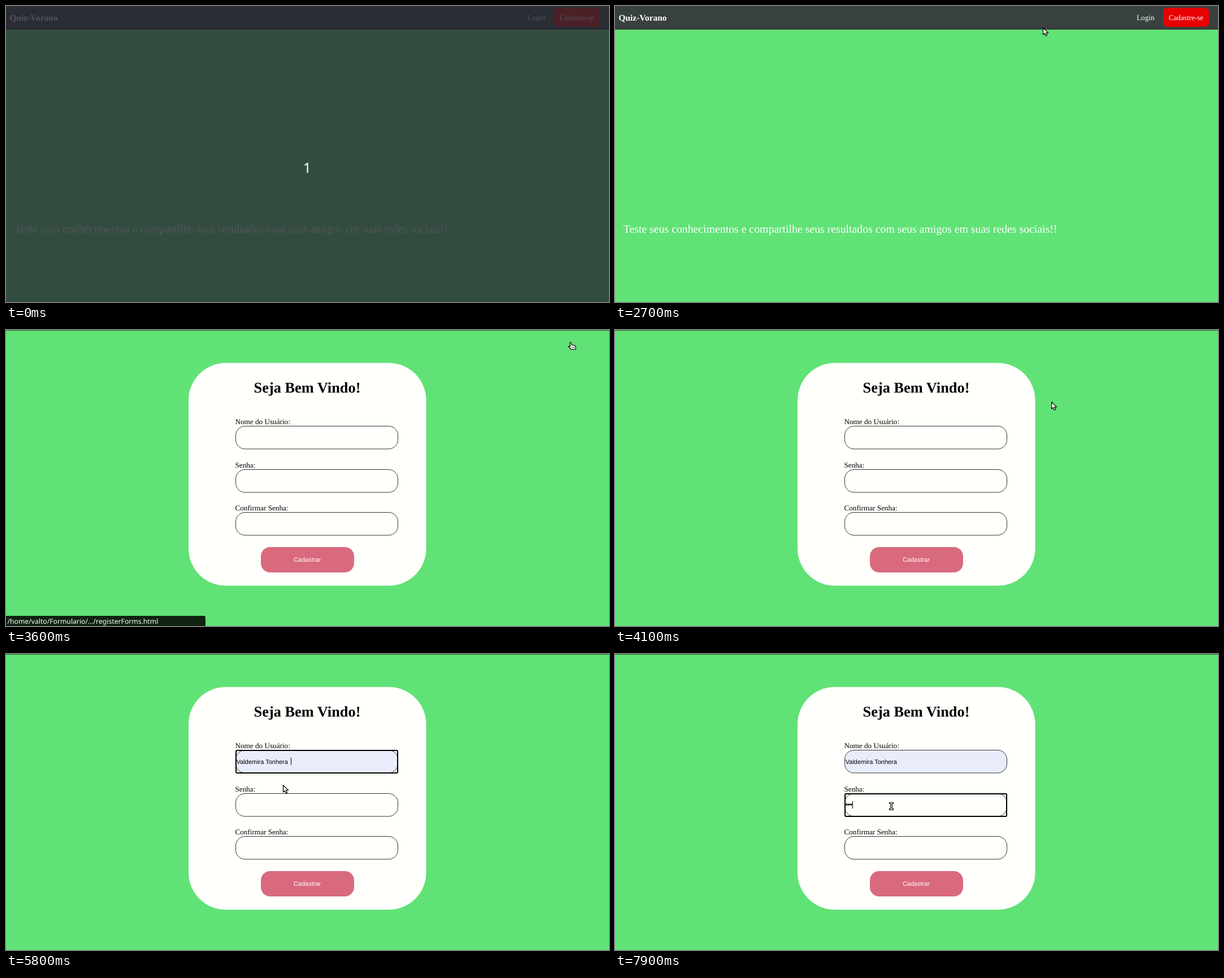
Animation, 1067 px wide and 525 px high, one loop 8 s. Source, as an HTML page with a canvas:

```html
<!DOCTYPE html>
<html lang="pt-BR">
<head>
<meta charset="utf-8">
<title>Cadastro</title>
<style>
  html, body { margin: 0; width: 1067px; height: 525px; overflow: hidden; }
  canvas { display: block; }
</style>
</head>
<body>
<canvas id="stage" width="1067" height="525"></canvas>
<script>
const ctx = document.getElementById('stage').getContext('2d');
const LOOP = 8000, STEP = 100;
const GREEN = '#61e276', PAPER = '#fffffc', INK = '#000';
const SERIF = '"Liberation Serif", serif';
const SANS = '"Liberation Sans", sans-serif';
const UI = '"Noto Sans", sans-serif';
const USER = 'Valdemira Tonhera';
const SUGGESTIONS = [USER, 'valdemirat.sorelo', 'admin', 'vtonhe52@fex.example', 'admin2', 'sto exp.'];

// Pointer key points: time, x, y, shape
const POINTER = [
  [2700, 757, 38, 'arrow'], [2800, 757, 38, 'arrow'], [3000, 880, 66, 'arrow'],
  [3200, 1057, 48, 'arrow'], [3400, 999, 22, 'hand'], [3600, 999, 22, 'hand'],
  [3700, 985, 30, 'arrow'], [4400, 612, 200, 'arrow'], [4500, 609, 201, 'beam'],
  [5200, 609, 201, 'beam'], [5300, 585, 214, 'arrow'], [5500, 490, 232, 'arrow'],
  [5800, 490, 232, 'arrow'], [6100, 452, 221, 'arrow'], [6200, 486, 237, 'arrow'],
  [6300, 486, 237, 'arrow'], [6400, 487, 241, 'arrow'], [6500, 493, 253, 'beam'],
  [7200, 493, 253, 'beam'], [7500, 489, 270, 'beam'], [LOOP, 489, 270, 'beam']
];

function text(str, x, y, font, color = INK, align = 'left') {
  ctx.font = font;
  ctx.fillStyle = color;
  ctx.textAlign = align;
  ctx.fillText(str, x, y);
}

function box(x, y, w, h, r, fill, stroke, lineWidth = 1) {
  ctx.beginPath();
  ctx.roundRect(x, y, w, h, r);
  if (fill) { ctx.fillStyle = fill; ctx.fill(); }
  if (stroke) { ctx.strokeStyle = stroke; ctx.lineWidth = lineWidth; ctx.stroke(); }
}

const SHAPES = {
  arrow: new Path2D('M.5 .8V13L3.4 10.4 5.4 15 7.6 14 5.6 9.6H9.6Z'),
  hand: new Path2D('M-1.5 0.5Q0 -1 1 .8L2 4.5 7 5.6Q9 6 9 8V12.5H1L-3.5 7.5Q-3 6 -.5 7.2Z'),
  beam: new Path2D('M-3.5 -6.5H3.5V-4.5H1.3V4.5H3.5V6.5H-3.5V4.5H-1.3V-4.5H-3.5Z')
};

function drawPointer(t) {
  if (t < POINTER[0][0]) return;
  const i = POINTER.findLastIndex(p => p[0] <= t);
  const [t0, x0, y0, shape] = POINTER[i];
  const [t1, x1, y1] = POINTER[i + 1];
  const k = (t - t0) / (t1 - t0);
  ctx.save();
  ctx.translate(Math.round(x0 + (x1 - x0) * k), Math.round(y0 + (y1 - y0) * k));
  ctx.fillStyle = '#fff';
  ctx.strokeStyle = INK;
  ctx.lineWidth = 1.2;
  ctx.lineJoin = 'round';
  ctx.fill(SHAPES[shape]);
  ctx.stroke(SHAPES[shape]);
  if (shape === 'hand') {
    ctx.beginPath();
    for (const x of [2.5, 4.5, 6.5]) { ctx.moveTo(x, 8); ctx.lineTo(x, 10.5); }
    ctx.lineWidth = 0.8;
    ctx.stroke();
  }
  ctx.restore();
}

function drawHome(t) {
  ctx.fillStyle = '#384040';
  ctx.fillRect(0, 0, 1067, 42);
  text('Quiz-Vorano', 6.5, 26, 'bold 15.42px ' + SERIF, '#fff');
  text('Login', 923, 24.5, '13.18px ' + SERIF, '#fff');
  box(970, 3, 81.5, 34, 8, t >= 3400 ? '#c80000' : '#e60000');
  text('Cadastre-se', 979.7, 24.5, '13.18px ' + SERIF, '#fff');
  text('Teste seus conhecimentos e compartilhe seus resultados com seus amigos em suas redes sociais!!',
    14.8, 402, '19.77px ' + SERIF, '#fff');
  if (t < 300) {
    ctx.fillStyle = 'rgba(39,41,49,.8)';
    ctx.fillRect(0, 0, 1067, 525);
    text('1', 533, 296, '25px ' + UI, '#fff', 'center');
  }
}

function drawField(label, y, focused, filled) {
  text(label, 405.5, y - 3.5, '13.18px ' + SERIF);
  box(406.5, y + .5, 287, 40.5, 16.5, filled ? '#e8ecfb' : PAPER, '#333');
  if (focused) box(407, y + 1, 286, 40, 2, null, INK, 2);
}

function drawCaret(x, y) {
  ctx.fillStyle = INK;
  ctx.fillRect(x, y, 1, 13);
}

function drawSuggestions(t) {
  ctx.save();
  ctx.shadowColor = 'rgba(0,0,0,.35)';
  ctx.shadowBlur = t < 4900 ? 4 : 8;
  ctx.shadowOffsetY = 2;
  box(405, 212, 289, 191.5, 2, PAPER);
  ctx.restore();
  if (t >= 5500) box(405, 219, 289, 30, 0, '#e9e9e7');
  SUGGESTIONS.forEach((s, i) => text(s, 415, 238.3 + i * 29.65, '500 12.9px ' + UI, '#222'));
}

function drawForm(t) {
  const onUser = t >= 4800 && t < 6700, onPassword = t >= 6700;
  const filled = t >= 5500;
  ctx.fillStyle = '#244a2b';
  ctx.fillRect(0, 0, 1067, 1);
  box(323, 58.5, 420.5, 395, 66, PAPER);
  text('Seja Bem Vindo!', 533, 111, 'bold 26.36px ' + SERIF, INK, 'center');
  drawField('Nome do Usuário:', 170, onUser, filled);
  drawField('Senha:', 247, onPassword);
  drawField('Confirmar Senha:', 323, false);
  box(451, 385, 165, 45, 16.5, '#d96a7d');
  text('Cadastrar', 533, 411, '10.98px ' + SANS, '#fff', 'center');

  if (filled) text(USER, 407.8, 194.5, '10.98px ' + SANS);
  if (t >= 4800 && t < 5300) drawCaret(408, 184);
  if (t >= 5800 && t < 6200) drawCaret(504, 184);
  if (t >= 4800 && t < 5800) drawSuggestions(t);

  const dots = Math.max(0, Math.min(3, Math.floor((t - 7200) / 200)));
  for (let i = 0; i < dots; i++) box(408.2 + i * 4, 265.2, 3.6, 3.6, 1.8, INK);
  if (onPassword && (t < 7200 || t >= 7400)) drawCaret(408 + dots * 4, 261);

  if (t < 3900) {
    box(0, 507, 353, 18, [0, 3, 0, 0], '#102212');
    text('/home/valto/Formulario/…/registerForms.html', 2.5, 520.5, '12.2px ' + UI, '#fff');
  }
}

function frame(now) {
  const t = Math.floor(now % LOOP / STEP) * STEP;
  ctx.textRendering = 'geometricPrecision';
  ctx.fillStyle = GREEN;
  ctx.fillRect(0, 0, 1067, 525);
  (t < 3600 ? drawHome : drawForm)(t);
  drawPointer(t);
  requestAnimationFrame(frame);
}
requestAnimationFrame(frame);
</script>
</body>
</html>
```
